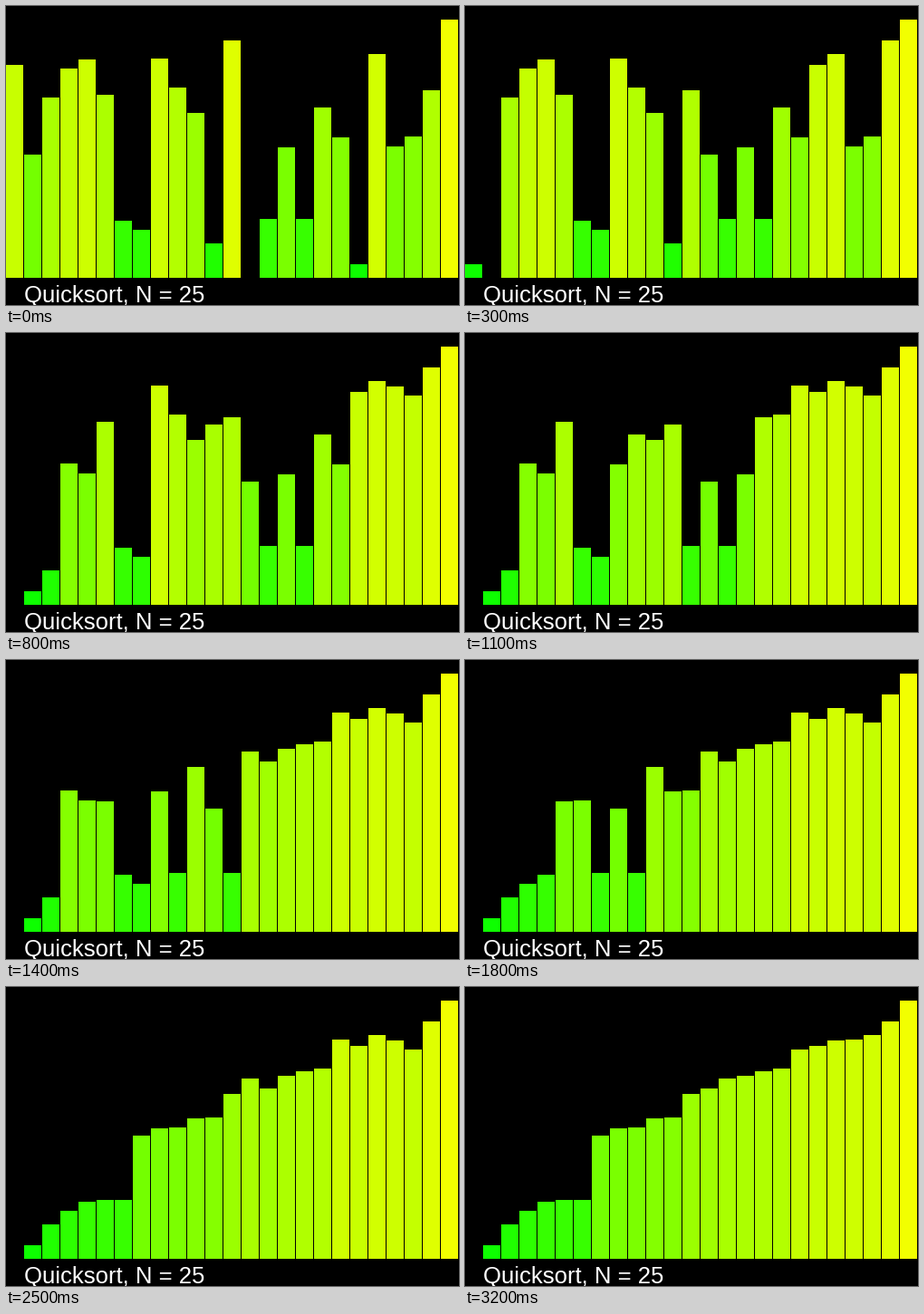
Recreate the animation shown at these times as a matplotlib script. Size 500x330 px, loop 3400 ms.

```python
import matplotlib.pyplot as plt
from matplotlib.animation import FuncAnimation

WIDTH, HEIGHT, DPI = 500, 330, 100
FLOOR = 300          # y of the bars' base, counted from the top
PITCH, BAR = 20, 19
STEP_MS = 100

VALUES = [235, 136, 199, 231, 241, 202, 63, 53, 242, 210, 182, 38, 262,
          0, 65, 144, 65, 188, 155, 15, 247, 145, 156, 207, 285]


def quicksort(a, low, high):
    """Hoare partition around the middle element, yielding after every swap."""
    i, j = low, high
    pivot = a[(low + high) // 2]
    while i <= j:
        while a[i] < pivot:
            i += 1
        while a[j] > pivot:
            j -= 1
        if i <= j:
            a[i], a[j] = a[j], a[i]
            i, j = i + 1, j - 1
            yield list(a)
    if low < j:
        yield from quicksort(a, low, j)
    if i < high:
        yield from quicksort(a, i, high)


states = [VALUES, *quicksort(list(VALUES), 0, len(VALUES) - 1)]

fig = plt.figure(figsize=(WIDTH / DPI, HEIGHT / DPI), dpi=DPI, facecolor="black")
ax = fig.add_axes([0, 0, 1, 1])
ax.set_xlim(0, WIDTH)
ax.set_ylim(HEIGHT, 0)
ax.axis("off")

bars = [ax.add_patch(plt.Rectangle((k * PITCH, FLOOR), BAR, 0, lw=0, antialiased=False))
        for k in range(len(VALUES))]
ax.text(20, 327, f"Quicksort, N = {len(VALUES)}", color="white",
        family="Liberation Sans", fontsize=25.7 * 72 / DPI, va="baseline")


def draw(step):
    for bar, value in zip(bars, states[step]):
        bar.set_y(FLOOR - value)
        bar.set_height(value)
        bar.set_facecolor((value / FLOOR, 1, 0))
        bar.set_visible(value > 0)
    return bars


animation = FuncAnimation(fig, draw, frames=len(states), interval=STEP_MS,
                          repeat=True, repeat_delay=0, blit=False)
plt.show()
```
